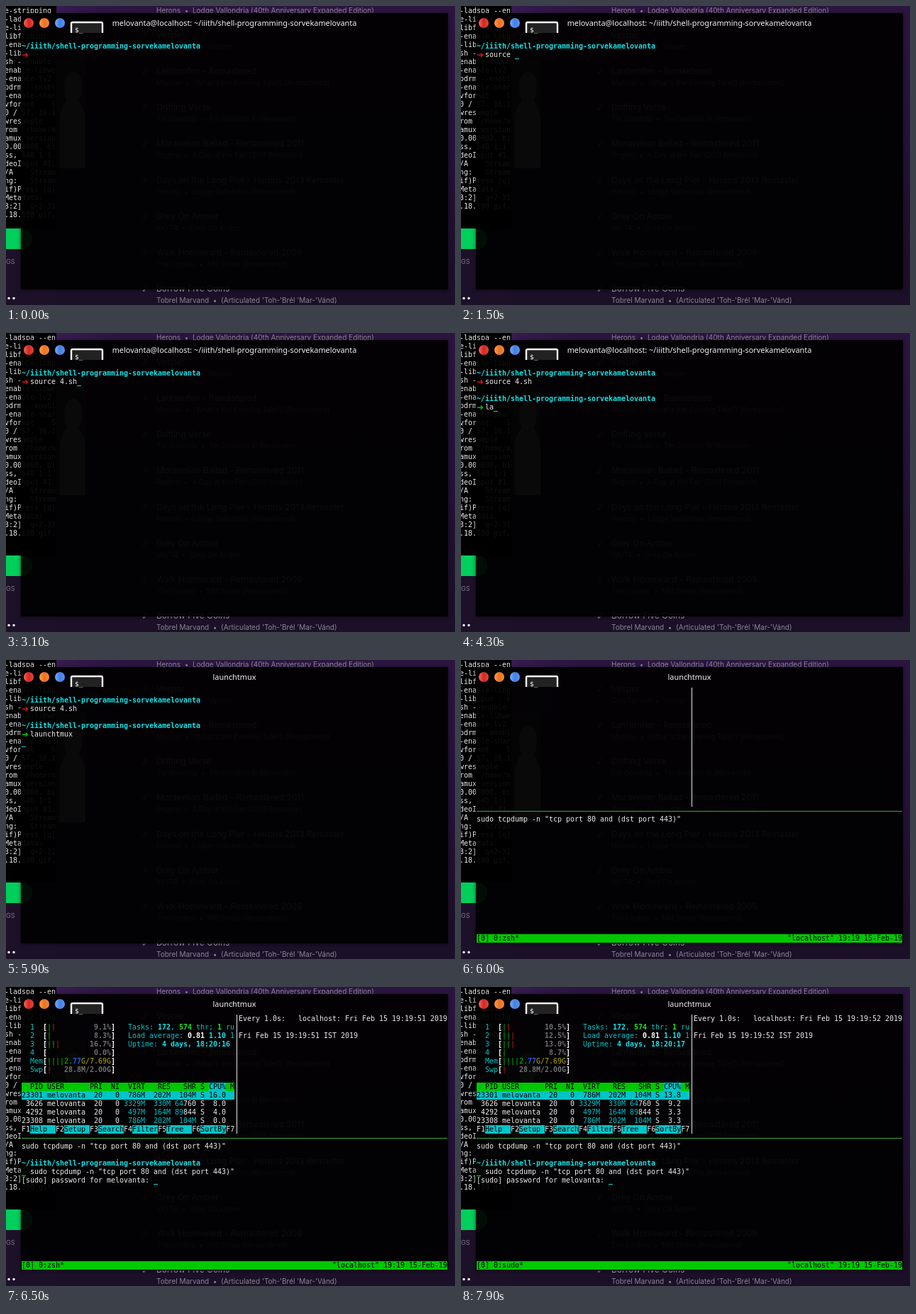
These frames come from a looping animation (633 by 422 pixels, 8000 ms). An HTML page:

```html
<!DOCTYPE html>
<html lang="en">
<head>
<meta charset="utf-8">
<title>Terminal session</title>
<style>
html, body { margin: 0; width: 100%; height: 100%; overflow: hidden; background: #1c1029; }
#stage { position: relative; width: 633px; height: 422px; overflow: hidden;
  background: linear-gradient(#2b1540, #24123a 45%, #1c1029 85%, #1b1028); }
#stage svg { position: absolute; left: 0; top: 0; }
.mono, #term { font: 10px/12px "DejaVu Sans Mono", monospace; letter-spacing: -.02px; white-space: pre; }
#back { position: absolute; left: 0; top: 0; width: 71px; height: 314px; overflow: hidden; background: #000; color: #ececec; }
#lines { position: absolute; left: -2px; }
#list { font-family: Inter, sans-serif; }
#list .song { font-size: 12px; fill: #b8b4bc; }
#list .by { font-size: 10px; fill: #8c8694; }
#win { position: absolute; left: 21px; top: 10px; width: 602px; height: 390px;
  background: rgba(0, 0, 0, .935); box-shadow: 0 1px 5px rgba(0, 0, 0, .6); }
#title { position: absolute; left: 0; right: 0; top: 6px; text-align: center; color: #f2f2f2;
  font: 10.9px/16px "Noto Sans", sans-serif; white-space: pre; }
#term { position: absolute; left: 22px; top: 39px; width: 600px; height: 360px; color: #ececec; }
#term div { position: absolute; height: 12px; }
#term span { display: inline-block; height: 12px; vertical-align: top; }
.path { color: #16e2e6; font-weight: bold; }
.c { color: #00c4c8; }
.C { color: #10e4e8; font-weight: bold; }
.g { color: #00c400; }
.G { color: #1ee01e; font-weight: bold; }
.r { color: #d01818; }
.b { color: #2a55d8; font-weight: bold; }
.y { color: #b4a800; }
.d { color: #707070; font-weight: bold; }
.W { color: #fff; font-weight: bold; }
.onW { background: #fff; color: #000; }
.onG { background: #00c800; color: #000; }
.onC { background: #00c4c8; color: #000; }
#term .arrow { font: bold 12px/12px "DejaVu Sans", sans-serif; letter-spacing: 0; }
</style>
</head>
<body>
<div id="stage">
  <svg width="633" height="422">
    <defs>
      <linearGradient id="glow"><stop stop-color="#381b52"/><stop offset="1" stop-color="#2b1540" stop-opacity="0"/></linearGradient>
    </defs>
    <rect x="71" width="120" height="75" fill="url(#glow)"/>
    <rect y="314" width="71" height="108" fill="#1d112a"/>
    <rect x="-20" y="314" width="57" height="29" rx="14" fill="#00cf5c"/>
    <text x="0" y="364" font-family="Inter, sans-serif" font-size="9" fill="#7d7785">GS</text>
    <circle cx="4" cy="412.5" r="1.7" fill="#fff"/><circle cx="11" cy="412.5" r="1.7" fill="#fff"/>
    <rect x="71" y="75" width="41" height="154" fill="#3c3c40"/>
    <path d="M76 229V155q4-17 10-21-8-20 0-36 10-12 19 2 5 20-3 34 8 8 10 26v69z" fill="#88888c"/>
    <g id="list"></g>
  </svg>
  <div id="back" class="mono"><div id="lines"></div></div>
  <div id="win"><div id="title"></div></div>
  <svg width="633" height="40">
    <defs>
      <linearGradient id="red"><stop stop-color="#f06a5c"/><stop offset=".5" stop-color="#d82420"/><stop offset="1" stop-color="#e24a40"/></linearGradient>
      <linearGradient id="orange"><stop stop-color="#f8a050"/><stop offset=".5" stop-color="#ee7020"/><stop offset="1" stop-color="#f08a3c"/></linearGradient>
      <linearGradient id="blue"><stop stop-color="#78aaf6"/><stop offset=".5" stop-color="#447fe6"/><stop offset="1" stop-color="#5c94ee"/></linearGradient>
    </defs>
    <circle cx="32" cy="24" r="7" fill="url(#red)"/>
    <circle cx="54" cy="24" r="7" fill="url(#orange)"/>
    <circle cx="76" cy="24" r="7" fill="url(#blue)"/>
    <path d="M92 38V25q0-2 2-2h40q2 0 2 2v13" fill="#222" stroke="#f4f4f4" stroke-width="2.4"/>
    <text x="97" y="36.5" font-family="DejaVu Sans Mono, monospace" font-size="9.5" fill="#fff">$_</text>
  </svg>
  <div id="term"></div>
</div>
<script>
const LOOP = 8000;
const USER = 'melovanta';
const PATH = '~/iiith/shell-programming-sorveka' + USER;
const DUMP = 'sudo tcpdump -n "tcp port 80 and (dst port 443)"';
const $ = id => document.getElementById(id);

const songs = [
  ['Lodge Gate', 'Herons  •  Lodge Vallondria (40th Anniversary Expanded Edition)'],
  ['Vesper', 'Orla Tamsin  •  Vesper'],
  ['Lanternfen - Remastered', "Marlow  •  (What's the Evening Tale?) [Remastered]"],
  ['Drifting Verse', 'Tin Gondola  •  Tin Gondola III (Remaster)'],
  ['Moravelian Ballad - Remastered 2011', 'Regent  •  A Day at the Fair (2011 Remaster)'],
  ['Days on the Long Pier - Herons 2013 Remaster', 'Herons  •  Lodge Vallondria (Remastered)'],
  ['Grey On Amber', 'VK/TR  •  Grey On Amber'],
  ['Walk Homeward - Remastered 2009', 'The Lindels  •  Mill Street (Remastered)'],
  ['Borrow Five Coins', "Tobrel Marvand  •  (Articulated 'Toh-'Brél 'Mar-'Vánd)"]
];
$('list').innerHTML = songs.map(([name, by], i) => {
  const y = 51.1 * i - 6;
  return `<text class="by" x="192" y="${y}">♪</text><text class="song" x="212" y="${y}">${name}</text>` +
    `<text class="by" x="212" y="${y + 16}" xml:space="preserve">${by}</text>`;
}).join('');

$('lines').textContent = `e-stripping
-ladspa --en
e-libass --e
libfribidi -
-enable-libg
-libopus --e
sh --enable-
enable-libwe
-enable-lv2 
pdrm --enabl
-enable-shar
vformat    5
0 / 57, 16.1
wresample   
rom '/home/m
amux version
0.000000, bi
ss, 640 1:1 
deoInput #1,
/A    Stream
ng:   Stream
if)Press [q]
Metadata:
3:2]  q=2-31
.18.100 gif,`;

// [time, typed text]
const first = [[200, ''], [500, 'so'], [600, 'sou'], [800, 'sour'], [1100, 'sourc'], [1500, 'source '],
  [2200, 'source 4'], [2800, 'source 411toppm'], [3000, 'source 4.sh']];
const second = [[3600, ''], [4100, 'l'], [4300, 'la'], [4500, 'lau'], [4700, 'laun'], [5000, 'launch'],
  [5300, 'launchtmux ']];
const marks = [0, ...first.map(s => s[0]), 3100, ...second.map(s => s[0]),
  5600, 5900, 6000, 6200, 6300, 6500, 7200, 7900];
const last = (steps, t) => (steps.filter(s => s[0] <= t).pop() || [0, ''])[1];

let out;
const box = (row, col, body) => {
  out += `<div style="left:${col * 6}px;top:${row * 12}px">${body}</div>`;
};
// Each part is plain text or [text, class].
const put = (row, col, ...parts) => box(row, col, parts.map(p =>
  Array.isArray(p) ? `<span class="${p[1]}">${p[0]}</span>` : `<span>${p}</span>`).join(''));
const rule = (x, y, w, h, color) => {
  out += `<div style="left:${x}px;top:${y}px;width:${w}px;height:${h}px;background:${color}"></div>`;
};
const cursor = (row, col, color = '#10d4d8') => rule(col * 6, row * 12 + 11, 6, 1, color);

function prompt(row, color, text) {
  put(row, 0, [PATH, 'path']);
  put(row + 1, 0, ['➜', 'arrow ' + color]);
  put(row + 1, 2, text);
}

function shell(t) {
  const a = last(first, t), b = last(second, t);
  prompt(1, 'r', a);
  if (t >= 200 && t < 3600) cursor(2, 2 + a.length);
  if (t >= 2200 && t < 3100) {
    if (t >= 2800 && t < 3000) put(3, 0, ['411toppm*', 'onW']);
    else put(3, 0, ['411toppm', 'G'], '*');
    if (t >= 3000) put(3, 11, ['4.sh*    ', 'onW']);
    else put(3, 11, ['4.sh', 'G'], '*');
  }
  if (t < 3600) return;
  prompt(4, 'g', b);
  if (t < 5600) cursor(5, 2 + b.length);
  if (t >= 5900) cursor(6, 0);
}

function meter(row, label, bars, ...value) {
  const len = value.reduce((n, v) => n + v[0].length, 0);
  put(row, 2, [label.padEnd(3), 'c'], ['[', 'W']);
  put(row, 6, ...[...bars].map(k => ['|', k]));
  put(row, 21 - len, ...value);
  put(row, 21, [']', 'W']);
}

function htop(late) {
  const cpu = late ? ['10.5%', '12.5%', '13.0%', '8.7%'] : ['9.1%', '8.3%', '16.7%', '0.0%'];
  const bars = late ? ['gr', 'ggr', 'ggr', 'g'] : ['gr', 'g', 'ggr', ''];
  cpu.forEach((v, i) => meter(i + 1, String(i + 1), bars[i], [v, 'd']));
  meter(5, 'Mem', 'gggg', ['2.', 'g'], ['77', 'b'], ['G/7.69G', 'y']);
  meter(6, 'Swp', 'r', ['28.8M/2.00G', 'd']);
  put(1, 25, ['Tasks: ', 'c'], ['172', 'C'], [', ', 'c'], ['574', 'G'], [' thr; ', 'c'], ['1', 'G'], [' ru', 'c']);
  put(2, 25, ['Load average: ', 'c'], ['0.81 ', 'W'], ['1.10 ', 'C'], ['1', 'c']);
  put(3, 25, ['Uptime: ', 'c'], ['4 days, 18:20:' + (late ? 17 : 16), 'C']);
  put(8, 0, ['  PID USER      PRI  NI  VIRT   RES   SHR S ', 'onG'], ['CPU%', 'onC'], [' M', 'onG']);
  const use = late ? ['13.8', '9.2', '3.3', '3.3'] : ['16.0', '8.0', '4.0', '0.0'];
  [[23301, '786M', '202M', '104M'], [3626, '3329M', '330M', '64760'],
   [4292, '497M', '164M', '89844'], [23308, '786M', '202M', '104M']].forEach(([pid, virt, res, shr], i) => {
    const head = `${String(pid).padStart(5)} ${USER}  20   0 `;
    const tail = ` S ${use[i].padStart(4)}`;
    const v = virt.padStart(5), r = res.padStart(6), s = shr.padStart(6);
    if (!i) put(9, 0, [(head + v + r + s + tail).padEnd(50), 'onC']);
    else if (shr.endsWith('M')) put(9 + i, 0, head, [v + r + s, 'c'], tail);
    else put(9 + i, 0, head, [v + r + s.slice(0, 3), 'c'], s.slice(3), tail);
  });
  const keys = ['Help', 'Setup', 'Search', 'Filter', 'Tree', 'SortBy'];
  put(13, 0, ...keys.flatMap((k, i) => ['F' + (i + 1), [k.padEnd(6), 'onC']]), 'F7');
}

function tmux(t) {
  rule(303, 0, 1, 168, '#e8e8e8');
  rule(0, 174, 600, 1, '#3aa63a');
  const right = '"localhost" 19:19 15-Feb-19';
  const left = '[0] 0:' + (t < 7200 ? 'zsh*' : 'sudo*');
  put(29, 0, [left.padEnd(100 - right.length) + right, 'onG']);
  put(15, 0, DUMP);
  if (t < 6200) return;
  const clock = '19:19:' + (t < 7200 ? 51 : 52);
  put(0, 51, `Every 1.0s:   localhost: Fri Feb 15 ${clock} 2019`);
  put(2, 51, `Fri Feb 15 ${clock} IST 2019`);
  put(17, 0, [PATH, 'path']);
  cursor(18, 0, '#1ee01e');
  put(18, 2, DUMP);
  if (t >= 6300) {
    const ask = `[sudo] password for ${USER}: `;
    put(19, 0, ask);
    cursor(19, ask.length);
  }
  if (t >= 6500) htop(t >= 7900);
}

function draw(t) {
  out = '';
  (t < 6000 ? shell : tmux)(t);
  $('term').innerHTML = out;
  $('title').textContent = t < 5900 ? `${USER}@localhost: ${PATH}` : 'launchtmux';
  $('lines').style.top = t < 200 ? '1px' : '-11px';
}

const start = performance.now();
let shown = -1;
function tick() {
  const t = Math.max(0, performance.now() - start) % LOOP;
  const mark = marks.filter(m => m <= t).pop();
  if (mark !== shown) draw(shown = mark);
  requestAnimationFrame(tick);
}
tick();
</script>
</body>
</html>
```
